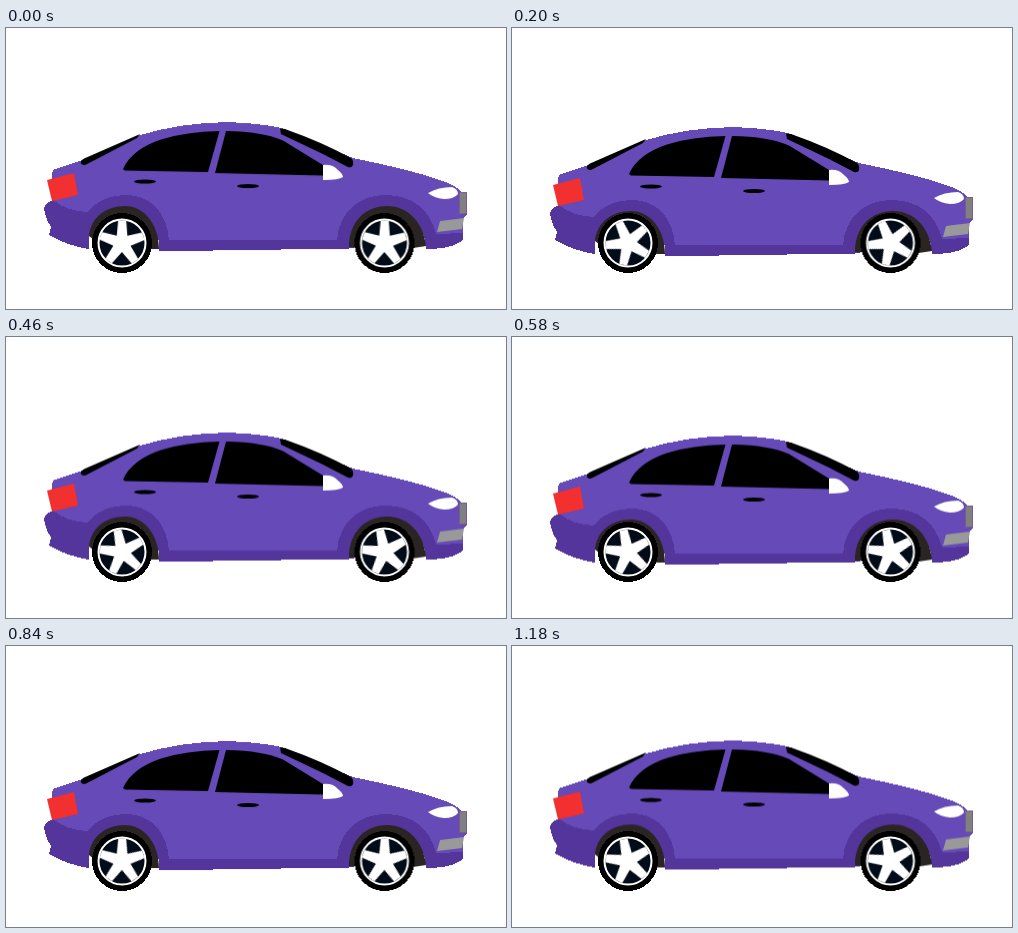
Recreate the animation shown at these times as an HTML page without scripts. Size 500x281 px, loop 1.2 s.

```html
<!DOCTYPE html>
<html lang="en">
<head>
<meta charset="utf-8">
<title>Driving car</title>
<style>
  html, body { margin: 0; width: 100%; height: 100%; overflow: hidden; background: #fff; }
  svg { display: block; width: 100%; height: 100%; }
  .body { animation: bob 200ms linear infinite alternate; }
  .star { fill: #fff; animation: spin 600ms linear infinite; }
  .rim { fill: #020b18; stroke: #fff; stroke-width: 2px; }
  .hard { shape-rendering: crispEdges; }
  @keyframes bob { to { transform: translateY(5px); } }
  @keyframes spin { to { transform: rotate(360deg); } }
</style>
</head>
<body>
<svg viewBox="0 0 500 281">
  <defs>
    <path id="star" d="M-4-22.500H4L5.300-7.300 20.200-10.800 22.600-3.200 8.600 2.800 16.500 15.900 10 20.600 0 9-10 20.600-16.500 15.900-8.600 2.800-22.600-3.200-20.200-10.800-5.300-7.300Z"/>
  </defs>

  <g class="body">
    <!-- shell -->
    <path class="hard" fill="#654ab8" d="M46 147Q46 142 49 141L76 132 134 107Q176 94.500 220 94.200 250 94.500 276 100L347 130Q405 142 431 151 450 157 456 164H461V186L457 191V206H425L345 212H153L83 208 40 178 47 172Z"/>

    <!-- lower trim -->
    <path class="hard" fill="#53359b" d="M38 180Q39 175 47 172 60 183 82 184C91 172 104 167 120 167C144 167 161 184 163 212H331C333 184 353 167 379 167C407 167 424 182 430 206L457 205V212Q446 221 420 221L418 206 343 220.500 153 223.300V212L83 208V221Q62 218 43 207L45 199Q39 190 38 180Z"/>

    <!-- wheel arches -->
    <path fill="#2a2522" d="M83 208C85 189 100 178 119 178S153 196 153 221H100ZM343 219C343 194 359 178 381 178S418 196 420 218L400 221Z"/>

    <!-- glass -->
    <path d="M117 141C123 127 138 117 155 111.500Q180 103.500 213.500 103L202 144 119 142.500ZM220 103Q257 103.500 277 112.500L317 137V147.500L209 145Z"/>
    <path d="M134 106 78 130.500Q74 133 75 135.500 77 138 81 136L131 110ZM274 100.500 279 101Q316 114 345 130 348 133 347 137 346 140 342 139L317 126 275 106Z"/>
    <ellipse cx="139" cy="153.500" rx="11" ry="2"/>
    <ellipse cx="242" cy="158" rx="11" ry="2"/>

    <!-- mirror and lights -->
    <path fill="#fff" d="M317 137Q327 136 332 142 337 146 337 149 333 152 317 152ZM422 165Q432 159 446 159 452 161 452 166 448 171 438 171 428 170 422 165Z"/>
    <path fill="#f23030" d="M41 152 68 145 72 167 46 173Z"/>
    <path fill="#808080" stroke="#7a5c8c" d="M453.500 164.500H460.500V185.500H453.500Z"/>
    <path fill="#999" d="M434 193 458 190 456 201 431 204Z"/>
  </g>

  <g transform="translate(116 215)">
    <circle class="hard" r="30"/>
    <circle class="rim" r="23.500"/>
    <g class="star"><use href="#star"/></g>
  </g>
  <g transform="translate(378.500 215)">
    <circle class="hard" r="30"/>
    <circle class="rim" r="23.500"/>
    <g class="star"><use href="#star"/></g>
  </g>
</svg>
</body>
</html>
```
